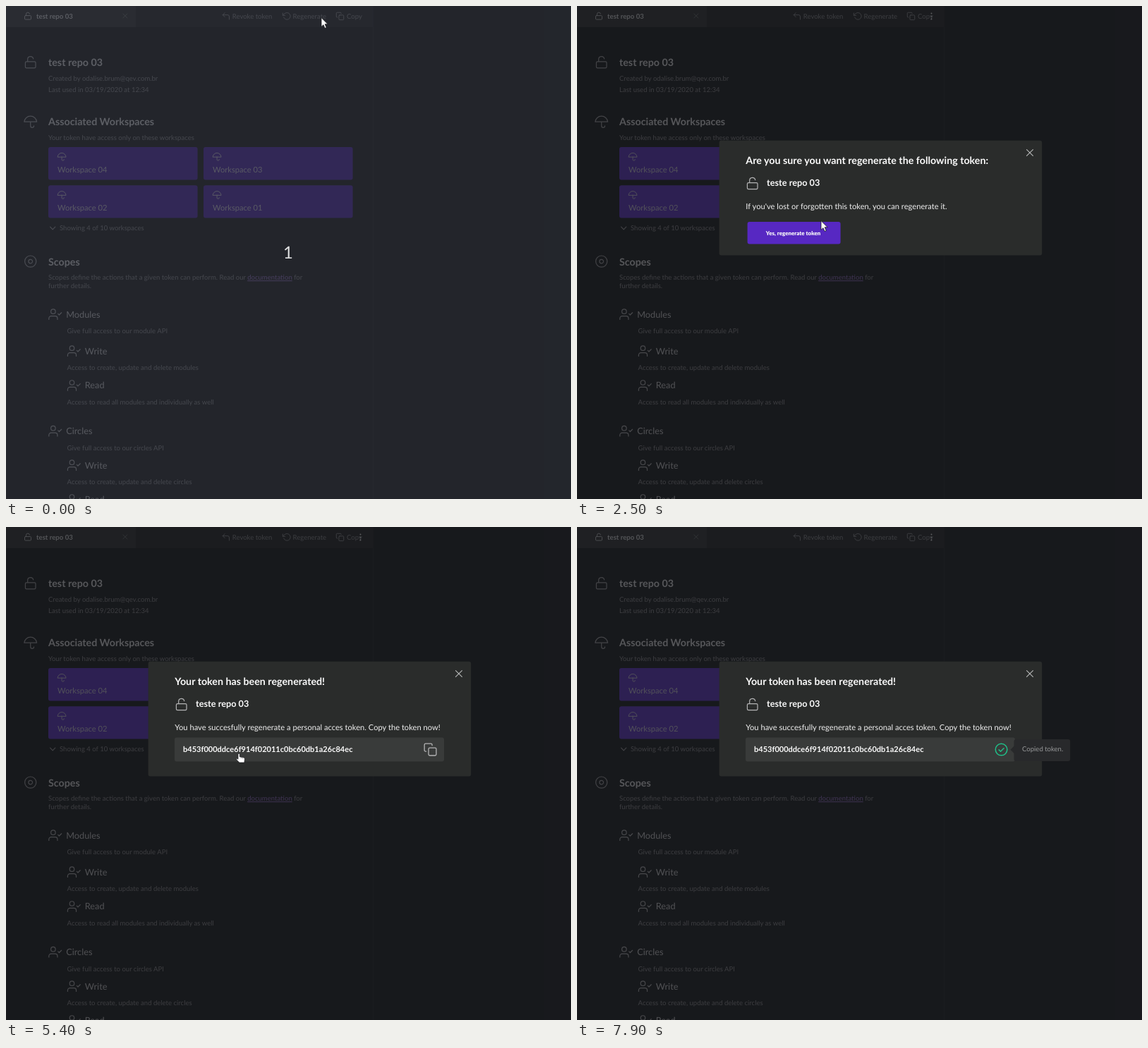
An HTML page for the animation above (8.6 s loop, 801 by 699 pixels).

```html
<!DOCTYPE html>
<html lang="en">
<head>
<meta charset="utf-8">
<title>Regenerate token</title>
<style>
html, body { margin: 0; width: 100%; height: 100%; overflow: hidden; background: #1b1c1c; }
svg { display: block; width: 801px; height: 699px; }
text { font-family: Lato, "Open Sans", sans-serif; white-space: pre; text-rendering: geometricPrecision; }
.card { fill: #5728c2; }
.behind .card { fill: #6a37e0; }
</style>
</head>
<body>
<svg id="stage" viewBox="0 0 801 699" xmlns="http://www.w3.org/2000/svg"></svg>
<script>
const LOOP = 8600;
const PURPLE = '#5728c2', WHITE = '#fafafa', SOFT = '#e6e6e6', GREY = '#9d9d9f';
const SMALL = 9.55, BODY = 11.16, LARGE = 12.74, TITLE = 14.28;

const ICONS = {
  unlock: 'M5 11h14a2 2 0 0 1 2 2v7a2 2 0 0 1-2 2H5a2 2 0 0 1-2-2v-7a2 2 0 0 1 2-2zM7 11V7a5 5 0 0 1 9.9-1',
  umbrella: 'M23 12a11.05 11.05 0 0 0-22 0zm-5 7a3 3 0 0 1-6 0v-7',
  user: 'M16 21v-2a4 4 0 0 0-4-4H5a4 4 0 0 0-4 4v2M4.5 7a4 4 0 1 0 8 0a4 4 0 1 0-8 0M17 11l2 2 4-4',
  target: 'M2 12a10 10 0 1 0 20 0a10 10 0 1 0-20 0M8.5 12a3.5 3.5 0 1 0 7 0a3.5 3.5 0 1 0-7 0',
  back: 'M9 14L4 9l5-5M20 20v-7a4 4 0 0 0-4-4H4',
  rotate: 'M1 4v6h6M3.51 15a9 9 0 1 0 2.13-9.36L1 10',
  copy: 'M11 9h9a2 2 0 0 1 2 2v9a2 2 0 0 1-2 2h-9a2 2 0 0 1-2-2v-9a2 2 0 0 1 2-2zM5 15H4a2 2 0 0 1-2-2V4a2 2 0 0 1 2-2h9a2 2 0 0 1 2 2v1',
  chevron: 'M6 9l6 6 6-6',
  close: 'M18 6L6 18M6 6l12 12',
  done: 'M2 12a10 10 0 1 0 20 0a10 10 0 1 0-20 0M7.8 12.4l3 2.8 5.4-5.4'
};

const rect = (x, y, w, h, fill, r = 0) =>
  `<rect x="${x}" y="${y}" width="${w}" height="${h}" rx="${r}" fill="${fill}"/>`;
const text = (x, y, str, size = SMALL, fill = GREY, weight = 400) =>
  `<text x="${x}" y="${y}" font-size="${size}" font-weight="${weight}" fill="${fill}">${str}</text>`;
const icon = (name, x, y, scale = 0.81, color = '#b4b4b5', width = 1.2) =>
  `<path d="${ICONS[name]}" transform="translate(${x} ${y}) scale(${scale})" fill="none" stroke="${color}"
    stroke-width="${width / scale}" stroke-linecap="round" stroke-linejoin="round"/>`;
const group = (id, body) => `<g id="${id}">${body}</g>`;

const card = (x, y, name) =>
  `<rect class="card" x="${x}" y="${y}" width="211.6" height="46.4" rx="3"/>` +
  icon('umbrella', x + 12.6, y + 7.3, 0.54, '#e4dcf6', 1) +
  text(x + 13, y + 36.2, name, BODY, '#e9e4f7');

const scope = (x, y, name, note) =>
  icon('user', x, y - 14, 0.81, '#c6c6c7') +
  text(x + 25.2, y, name, LARGE, SOFT) +
  (note ? text(x + (x < 80 ? 26.6 : 0), y + 22.6, note) : '');

function page() {
  return rect(0, 0, 801, 699, '#1b1c1c') +
    rect(0, 0, 520, 30, '#262727') +
    rect(0, 0, 184, 30, '#353736') +
    rect(520, 0, 1, 699, '#272829') +
    rect(0, 30, 1, 669, '#262728') +
    icon('unlock', 25, 8.1, 0.5, '#d2d2d2', 1) +
    text(43, 17.5, 'test repo 03', 9.6, '#f0f0f0', 700) +
    icon('close', 162.8, 8, 0.5, '#848585', 0.8) +
    icon('back', 304.9, 7.4, 0.58, GREY, 1) +
    text(320.8, 18, 'Revoke token') +
    icon('rotate', 391.8, 7.9, 0.54, GREY, 1) +
    text(406.6, 18, 'Regenerate') +
    icon('copy', 467.3, 8.2, 0.52, GREY, 1) +
    text(483, 18, 'Copy') +

    icon('unlock', 25, 70) +
    text(60, 85, 'test repo 03', TITLE, WHITE, 700) +
    text(60, 105.8, 'Created by odalise.brum@qev.com.br') +
    text(60, 121.5, 'Last used in 03/19/2020 at 12:34') +

    icon('umbrella', 25, 154.5) +
    text(60, 169, 'Associated Workspaces', TITLE, WHITE, 700) +
    text(60, 189.8, 'Your token have access only on these workspaces') +
    card(60, 200, 'Workspace 04') + card(280, 200, 'Workspace 03') +
    card(60, 254.2, 'Workspace 02') + card(280, 254.2, 'Workspace 01') +
    icon('chevron', 59, 307.8, 0.6, '#b4b4b5', 1.1) +
    text(76, 318.3, 'Showing 4 of 10 workspaces') +

    icon('target', 25, 352.4) +
    text(60, 367.5, 'Scopes', TITLE, WHITE, 700) +
    text(60, 388.2, 'Scopes define the actions that a given token can perform. Read our ' +
      '<tspan fill="#a67be0" text-decoration="underline">documentation</tspan> for') +
    text(60, 400.2, 'further details.') +

    scope(60, 441.5, 'Modules', 'Give full access to our module API') +
    scope(86.6, 493.5, 'Write', 'Access to create, update and delete modules') +
    scope(86.6, 542.3, 'Read', 'Access to read all modules and individually as well') +
    scope(60, 607, 'Circles', 'Give full access to our circles API') +
    scope(86.6, 655.5, 'Write', 'Access to create, update and delete circles') +
    scope(86.6, 704.3, 'Read');
}

function dialog() {
  const dots = [10.5, 14.5, 18.5].map(y => `<circle cx="502.5" cy="${y}" r="1" fill="#5c5d60"/>`).join('');
  const ask =
    text(239.3, 223.7, 'Are you sure you want regenerate the following token:', TITLE, WHITE, 700) +
    text(239.3, 288.2, "If you've lost or forgotten this token, you can regenerate it.", BODY, '#f0f0f0') +
    rect(241.6, 306, 132, 31.6, PURPLE, 3) +
    text(267.8, 324.6, 'Yes, regenerate token', 7.96, WHITE, 900);
  const result =
    text(239.3, 223.7, 'Your token has been regenerated!', TITLE, WHITE, 700) +
    text(239.3, 288.2, 'You have succesfully regenerate a personal acces token. Copy the token now!', BODY, '#f0f0f0') +
    rect(239, 298.6, 382, 34, '#393b3a', 3) +
    text(251, 318.6, 'b453f000ddce6f914f02011c0bc60db1a26c84ec', 11.04, WHITE, 700) +
    group('copyIcon', icon('copy', 591.5, 305.5, 0.84, '#b4b4b5', 1.3)) +
    group('copied',
      icon('done', 591.6, 305.6, 0.83, '#20bf88', 1.5) +
      '<path d="M614.5 315.8l6-6v12z" fill="#28292b"/>' +
      rect(619.5, 301, 79.7, 31, '#28292b', 3) +
      text(631, 318.3, 'Copied token.', SMALL, '#98999a'));
  return rect(0, 0, 801, 699, 'rgba(23,24,29,.72)') + dots +
    rect(201.6, 190.8, 457.6, 162.8, '#2a2c2b', 3) +
    icon('close', 633.1, 199.1, 0.74, '#b9baba', 1.1) +
    icon('unlock', 239, 241.8) +
    text(269, 255, 'teste repo 03', 12.72, WHITE, 700) +
    group('ask', ask) + group('result', result);
}

const stage = document.getElementById('stage');
stage.innerHTML = group('page', page()) +
  group('intro', rect(0, 0, 801, 699, 'rgba(38,41,49,.74)') +
    text(393, 358.3, '1', 24, '#dedfe0')) +
  group('dialog', dialog()) +
  group('arrow', '<path d="M0 .5V13.4l3-2.7 2.1 4.8 2.2-1-2.1-4.7h4z" fill="#fff" stroke="#15161a" stroke-width=".8"/>') +
  group('hand', '<path d="M3 1.4a1.2 1.2 0 0 1 2.4 0V4.8l5.4 1Q12.7 6.2 12.5 8L11.9 13H4.8L.9 9Q.2 7.6 1.6 7.3L3 8.2z" ' +
    'fill="#fff" stroke="#15161a" stroke-width=".7"/><path d="M7.4 5.4v2M9.6 5.8v2" stroke="#555" stroke-width=".5"/>');

// Pointer poses, each held until the next one starts.
const poses = [];
const pose = (time, kind, x = 0, y = 0) => poses.push({ time, kind, x, y });
const smooth = u => u * u * (3 - 2 * u);
function glide(start, steps, kind, from, bend, to, ease = u => u) {
  for (let i = 1; i <= steps; i++) {
    const u = ease(i / steps), v = 1 - u;
    const at = k => v * v * from[k] + 2 * u * v * bend[k] + u * u * to[k];
    pose(start + (i - 1) * 100, kind, at(0), at(1));
  }
}
pose(0, 'arrow', 447, 16);
pose(100, 'hand', 444, 16);
pose(1400, 'arrow', 447, 16);
glide(2100, 5, 'arrow', [447, 16], [420, 170], [346, 304], smooth);
glide(2700, 6, 'arrow', [346, 304], [366, 370], [318, 320]);
pose(3400, 'hand', 317.5, 321);
pose(4200, 'arrow', 318, 321);
pose(4400, 'hand', 317.5, 321);
pose(5400, 'hand', 326, 321);
glide(5600, 3, 'hand', [326, 321], [370, 319], [414, 312]);
glide(6000, 5, 'hand', [414, 312], [481, 292], [601, 318]);
pose(7800, 'arrow', 258, 47);
pose(7900, 'none');

const parts = {};
for (const id of ['page', 'intro', 'dialog', 'ask', 'result', 'copyIcon', 'copied', 'arrow', 'hand'])
  parts[id] = document.getElementById(id);
const show = (id, on) => parts[id].setAttribute('display', on ? 'inline' : 'none');

function draw(t) {
  parts.page.classList.toggle('behind', t >= 1400);
  show('intro', t < 100);
  show('dialog', t >= 1400);
  show('ask', t < 4400);
  show('result', t >= 4400);
  show('copyIcon', t < 6800);
  show('copied', t >= 6800);
  const now = poses.filter(p => p.time <= t).pop();
  for (const kind of ['arrow', 'hand']) {
    show(kind, now.kind === kind);
    parts[kind].setAttribute('transform', `translate(${now.x} ${now.y})`);
  }
}

const begin = performance.now();
function tick() {
  draw((performance.now() - begin) % LOOP);
  requestAnimationFrame(tick);
}
tick();
</script>
</body>
</html>
```
